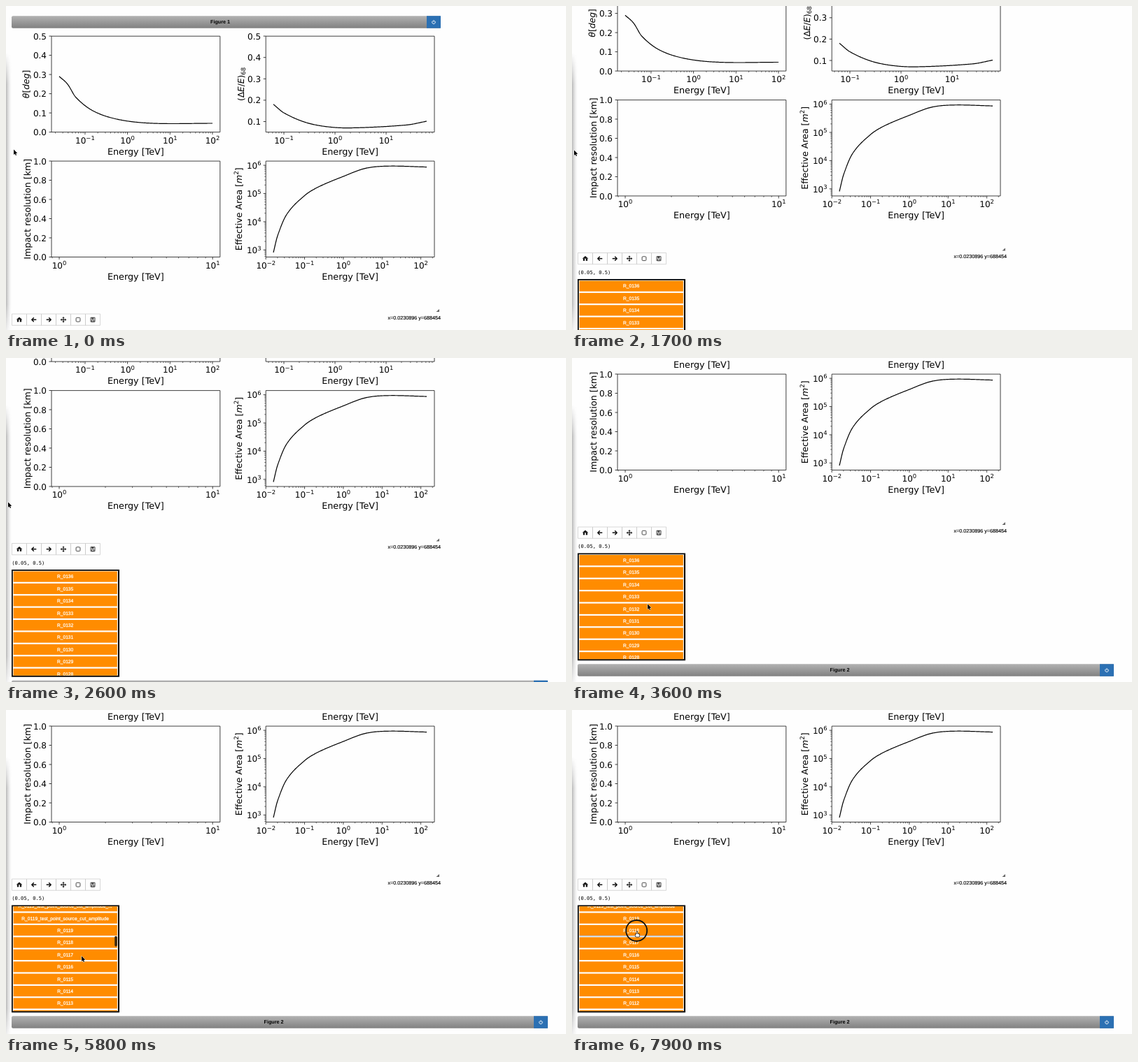
An HTML page with a canvas for the animation above (8000 ms loop, 800 by 464 pixels).

```html
<!DOCTYPE html>
<html lang="en">
<head>
<meta charset="utf-8">
<title>Notebook figures</title>
<style>
html, body { margin: 0; width: 100%; height: 100%; overflow: hidden; background: #fefefe; }
canvas { display: block; width: 800px; height: 464px; }
</style>
</head>
<body>
<canvas id="stage"></canvas>
<script>
const canvas = document.getElementById('stage');
const ctx = canvas.getContext('2d');
const ratio = window.devicePixelRatio || 1;
canvas.width = 800 * ratio;
canvas.height = 464 * ratio;

const PLOT = '"DejaVu Sans", sans-serif';
const UI = '"Liberation Sans", Arial, sans-serif';
const MONO = '"DejaVu Sans Mono", monospace';
const PAPER = '#fefefe', INK = '#111';
const LOOP = 8000, STEP = 100;
const PITCH = 17.4, CLICK = 7700;

// Smooth function through a few points, constant beyond both ends
function spline(points) {
  const last = points.length - 1;
  const slope = i => {
    const [x0, y0] = points[Math.max(i - 1, 0)], [x1, y1] = points[Math.min(i + 1, last)];
    return (y1 - y0) / (x1 - x0);
  };
  return x => {
    if (x <= points[0][0]) return points[0][1];
    if (x >= points[last][0]) return points[last][1];
    const i = points.findIndex(p => p[0] > x) - 1;
    const [x0, y0] = points[i], [x1, y1] = points[i + 1];
    const d = x1 - x0, u = (x - x0) / d, v = 1 - u;
    return y0 * v * v * (1 + 2 * u) + y1 * u * u * (1 + 2 * v)
      + d * u * v * (slope(i) * v - slope(i + 1) * u);
  };
}

function ease(t, start, end) {
  const u = Math.min(1, Math.max(0, (t - start) / (end - start)));
  return u * u * (3 - 2 * u);
}

const pageScroll = spline([[200, 0], [900, 36], [1700, 87.5], [2600, 175.5], [2900, 199]]);
const listScroll = spline([[3800, 0], [4600, 94], [5800, 304.6], [6200, 322]]);

const angular = [[76, 100.8], [88, 112], [100, 131], [125, 150.5], [161, 162.6], [210, 168], [295, 168]];
const spread = [[382, 140.8], [397, 153], [426, 166], [455, 172.4], [490, 174.6], [572, 170.4], [601, 165]];
const area = [[382, 353], [388, 329], [401, 298.5], [426, 272], [446, 259.3], [482, 244],
  [513, 232.6], [545, 229.3], [601, 230.6]];

const rows = [];
for (let n = 136; n > 100; n--) {
  const name = 'R_0' + n, long = name + '_test_point_source_cut_amplitude';
  if (n === 119) rows.push(long + '_...', long);
  rows.push(name);
}

function box(x, y, w, h, fill) {
  ctx.fillStyle = fill;
  ctx.fillRect(x, y, w, h);
}

function roundBox(x, y, w, h, r, fill) {
  ctx.beginPath();
  ctx.roundRect(x, y, w, h, r);
  ctx.fillStyle = fill;
  ctx.fill();
}

function line(points, width = 0.8, color = INK) {
  ctx.beginPath();
  points.forEach(([x, y]) => ctx.lineTo(x, y));
  ctx.lineWidth = width;
  ctx.strokeStyle = color;
  ctx.stroke();
}

function arc(x, y, r, width, color, from = 0, to = Math.PI * 2) {
  ctx.beginPath();
  ctx.arc(x, y, r, from, to);
  ctx.lineWidth = width;
  ctx.strokeStyle = color;
  ctx.stroke();
}

function shape(points, fill) {
  ctx.beginPath();
  points.forEach(([x, y]) => ctx.lineTo(x, y));
  ctx.closePath();
  ctx.fillStyle = fill;
  ctx.fill();
}

// The optional outline thickens small interface text
function text(str, x, y, font, align = 'left', color = '#000', weight = 0) {
  ctx.font = font;
  ctx.textAlign = align;
  ctx.fillStyle = ctx.strokeStyle = color;
  ctx.fillText(str, x, y);
  if (!weight) return;
  ctx.lineWidth = weight;
  ctx.strokeText(str, x, y);
}

// Parts: [string, size, rise, style]; align 0 = left, 0.5 = centre, 1 = right
function rich(parts, x, y, align) {
  const fontOf = ([, size, , style = '']) => `${style} ${size}px ${PLOT}`;
  const widths = parts.map(p => {
    ctx.font = fontOf(p);
    return ctx.measureText(p[0]).width;
  });
  x -= align * widths.reduce((a, b) => a + b, 0);
  parts.forEach((p, i) => {
    text(p[0], x, y - (p[2] || 0), fontOf(p));
    x += widths[i];
  });
}

const power = (e, x, y, align) =>
  rich([['10', 12], [String(e).replace('-', '\u2212'), 8.4, 4.6]], x, y, align);

// Splits a label at asterisks: every second piece is italic
const math = (label, size) =>
  label.split('*').map((s, i) => [s, size, 0, i % 2 ? 'italic' : '']);

function sideLabel(parts, x, y) {
  ctx.save();
  ctx.translate(x, y);
  ctx.rotate(-Math.PI / 2);
  rich(parts, 0, 0, 0.5);
  ctx.restore();
}

function tick(x, y, horizontal, major = true) {
  const length = major ? 3.5 : 2;
  line([[x, y], horizontal ? [x - length, y] : [x, y + length]], major ? 0.8 : 0.6);
}

// Visits each major and minor position of a logarithmic axis
function logTicks(one, decade, lo, hi, visit) {
  for (let e = -2; e <= 6; e++) {
    for (let m = 1; m < 10; m++) {
      const p = one + decade * (e + Math.log10(m));
      if (p >= lo - 0.5 && p <= hi + 0.5) visit(p, m === 1, e);
    }
  }
}

function axes(left, top, one, decade, label, labelX) {
  const right = left + 240.8, bottom = top + 137.4;
  ctx.strokeStyle = INK;
  ctx.lineWidth = 0.8;
  ctx.strokeRect(left, top, right - left, bottom - top);
  logTicks(one, decade, left, right, (x, major, e) => {
    tick(x, bottom, false, major);
    if (major) power(e, x, bottom + 16, 0.5);
  });
  rich([['Energy [TeV]', 12.75]], (left + right) / 2, bottom + 32, 0.5);
  sideLabel(label, labelX, (top + bottom) / 2);
}

function linearY(left, y0, gap, first, step, count) {
  for (let i = 0; i < count; i++) {
    const y = y0 - i * gap;
    tick(left, y, true);
    rich([[(first + i * step).toFixed(1), 12]], left - 7, y + 4.5, 1);
  }
}

function curve(points) {
  const f = spline(points), path = [];
  for (let x = points[0][0]; x <= points[points.length - 1][0]; x++) path.push([x, f(x)]);
  line(path, 1.2, '#000');
}

function plots() {
  const left = 65, right = 371.2, upper = 43.2, lower = 222.1;

  axes(left, upper, 173.6, 60.7, math('*θ*[*deg*]', 12.4), 33);
  linearY(left, 180.6, 27.5, 0, 0.1, 6);
  curve(angular);

  axes(right, upper, 470, 73, [...math('(Δ*E*/*E*)', 12.2), ['68', 8.6, -2]], 340);
  linearY(right, 165.5, 30.6, 0.1, 0.1, 5);
  curve(spread);

  axes(left, lower, 76, 219.2, math('Impact resolution [km]', 12.65), 34.5);
  linearY(left, 359.5, 27.5, 0, 0.2, 6);

  axes(right, lower, 481.9, 55.35,
    [...math('Effective Area [*m*', 12.5), ['2', 8.75, 4.8], [']', 12.5]], 337);
  logTicks(470.5, -40.4, lower, 359.5, (y, major, e) => {
    tick(right, y, true, major);
    if (major) power(e, 364.5, y + 4.8, 1);
  });
  curve(area);
}

function titleBar(y, right, title) {
  const g = ctx.createLinearGradient(0, y, 0, y + 17.5);
  g.addColorStop(0, '#b2b2b2');
  g.addColorStop(1, '#818181');
  roundBox(8, y, right - 8, 17.5, 2, g);
  box(right - 20, y, 20, 17.5, '#2b70b3');
  const x = right - 10, cy = y + 9;
  arc(x, cy, 2.3, 0.9, '#fff', -Math.PI * 0.28, Math.PI * 1.28);
  line([[x, cy - 3.2], [x, cy - 0.2]], 0.9, '#fff');
  text(title, right / 2 - 4.5, y + 10.4, `bold 7.2px ${UI}`, 'center');
}

function arrow(x, y, dir) {
  line([[x - 3.3 * dir, y], [x + 3 * dir, y]], 1.5);
  line([[x + 0.2 * dir, y - 3], [x + 3.2 * dir, y], [x + 0.2 * dir, y + 3]], 1.5);
}

function toolbar() {
  const y = 449.2, centre = i => 19 + 21 * i;
  ctx.lineWidth = 0.7;
  ctx.strokeStyle = '#c8c8c8';
  for (let i = 0; i < 6; i++) ctx.strokeRect(centre(i) - 10.5, 441, 21, 16.3);

  const home = centre(0);
  shape([[home - 4.3, y], [home, y - 3.8], [home + 4.3, y]], INK);
  box(home - 3.1, y, 2.3, 3.2, INK);
  box(home + 0.8, y, 2.3, 3.2, INK);
  arrow(centre(1), y, -1);
  arrow(centre(2), y, 1);
  for (let k = 0; k < 4; k++) {
    ctx.save();
    ctx.translate(centre(3), y);
    ctx.rotate(k * Math.PI / 2);
    line([[0, 0], [3, 0]], 1.1);
    shape([[2.4, -1.7], [4.3, 0], [2.4, 1.7]], INK);
    ctx.restore();
  }
  ctx.lineWidth = 0.9;
  ctx.strokeStyle = '#333';
  ctx.beginPath();
  ctx.roundRect(centre(4) - 2.9, y - 2.9, 5.8, 5.8, 1.2);
  ctx.stroke();
  const disk = centre(5);
  ctx.strokeRect(disk - 3, y - 3, 6, 6);
  ctx.strokeRect(disk - 1.6, y + 0.5, 3.2, 2.5);
  box(disk - 1.8, y - 3, 3.2, 2.2, '#333');

  shape([[619, 434], [619, 438], [614.5, 438]], '#666');
  text('x=0.0230896 y=688454', 621, 448.6, `7.2px ${UI}`, 'right', '#000', 0.15);
  text('(0.05, 0.5)', 8.3, 471, `7.1px ${MONO}`);
}

function list(t) {
  const scroll = listScroll(t);
  box(8, 478.5, 154, 153.7, '#000');
  ctx.save();
  ctx.beginPath();
  ctx.rect(9.7, 480.3, 150.2, 150);
  ctx.clip();
  box(8, 478, 154, 154, PAPER);
  rows.forEach((name, i) => {
    const y = 488.6 + i * PITCH - scroll;
    box(10.6, y - 7.6, 148.2, 15.2, '#ff8c00');
    text(name, 84.6, y + 2.3, `6.7px ${UI}`, 'center', '#fff', 0.25);
    if (t >= CLICK && name === 'R_0118') box(10.6, y + 7.6, 148.2, 1.2, '#a9bcd6');
  });
  ctx.restore();
  ctx.globalAlpha = t < 3800 ? 0 : 1 - ease(t, 6300, 6800);
  roundBox(155.2, 479.4 + scroll * 0.142, 3.6, 15, 1.8, '#3a2a12');
  ctx.globalAlpha = 1;
}

function windowShadow() {
  for (let y = 66; y < 464; y += 2) {
    const fade = Math.min(1, (y - 66) / 45, (476 - y) / 50);
    const g = ctx.createLinearGradient(0, 0, 8, 0);
    for (let u = 0; u <= 1; u += 0.25) g.addColorStop(u, `rgba(0,0,0,${0.27 * fade * (1 - u) ** 1.5})`);
    box(0, y, 8, 2, g);
  }
}

function pointer(t) {
  const toEdge = ease(t, 100, 600), toList = ease(t, 2900, 3600), toRow = ease(t, 6700, 7300);
  ctx.save();
  ctx.translate(11 - 8 * toEdge + 105 * toList - 15 * toRow,
    205.5 + toEdge + 146 * toList - 35.5 * toRow);
  if (toRow < 0.05) {
    const body = [[0, 0], [0, 7.4], [1.7, 5.9], [2.9, 8.6], [4.1, 8.1], [3, 5.4], [5.2, 5.3]];
    line([...body, body[0]], 1, '#fff');
    shape(body, '#000');
  } else {
    roundBox(-3, 3, 7, 5.4, 2, INK);
    roundBox(-1.2, -0.4, 2.2, 6, 1, INK);
    roundBox(-2.3, 3.7, 5.6, 4, 1.5, '#fff');
    roundBox(-0.6, 0.2, 1, 5, 0.5, '#fff');
  }
  ctx.restore();
  if (t >= CLICK) arc(92.2, 316, 15, 1.8, INK);
}

function draw(now) {
  const t = Math.floor((now % LOOP) / STEP) * STEP;
  ctx.setTransform(ratio, 0, 0, ratio, 0, 0);
  ctx.textRendering = 'geometricPrecision';
  ctx.lineJoin = 'round';
  box(0, 0, 800, 464, PAPER);
  windowShadow();
  ctx.save();
  ctx.translate(0, -pageScroll(t));
  titleBar(14.2, 621, 'Figure 1');
  plots();
  toolbar();
  list(t);
  titleBar(637.3, 774, 'Figure 2');
  ctx.restore();
  pointer(t);
}

const start = performance.now();
function frame() {
  draw(performance.now() - start);
  requestAnimationFrame(frame);
}
frame();
</script>
</body>
</html>
```
